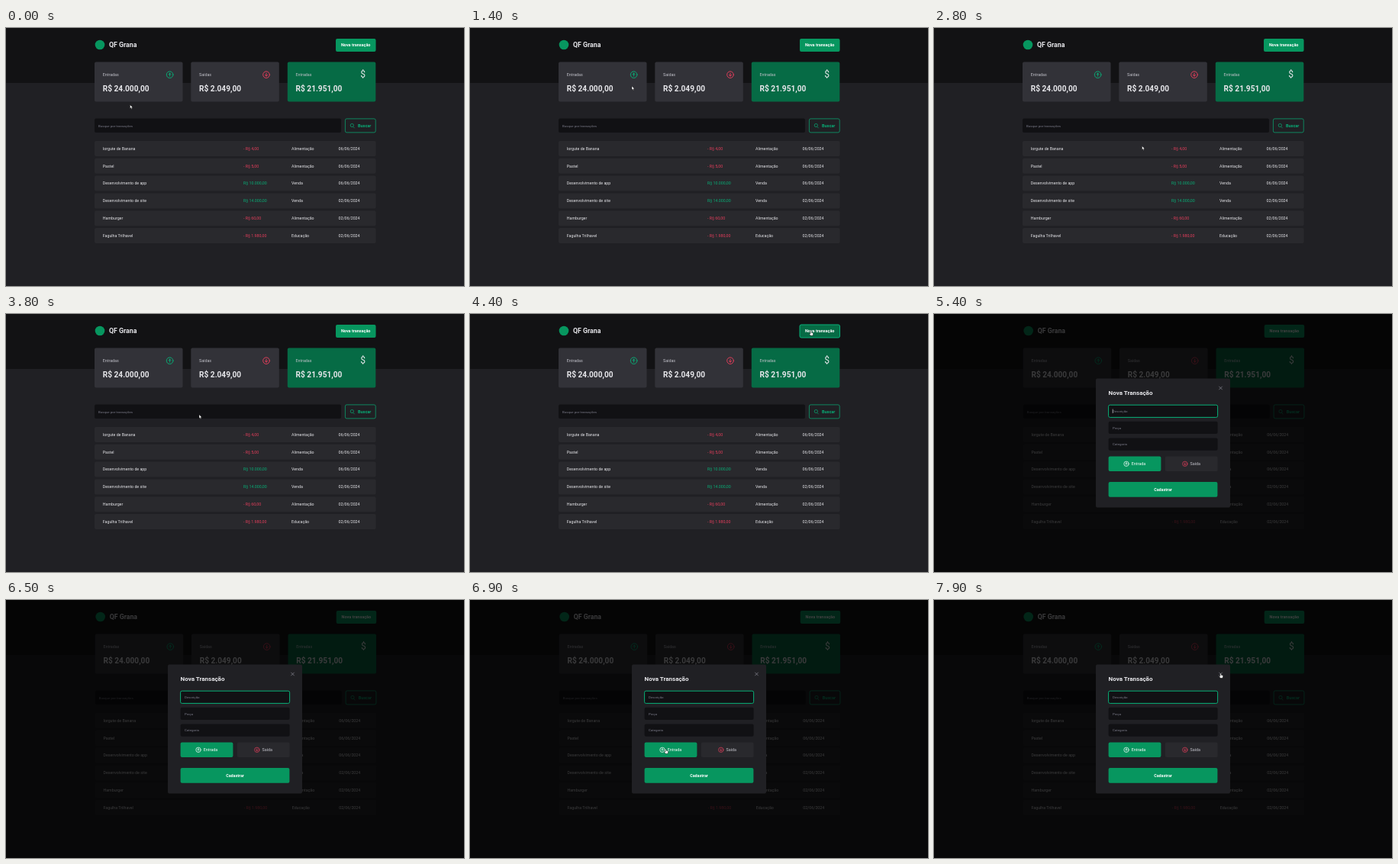
These frames come from a looping animation (600x338 px, 8 s). An HTML page:

```html
<!DOCTYPE html>
<html lang="pt-BR">
<head>
<meta charset="utf-8">
<title>Transações</title>
<style>
  html, body { margin: 0; width: 100%; height: 100%; overflow: hidden; background: #121214; }
  svg { display: block; width: 100vw; height: 100vh; font-family: Roboto, sans-serif; }
</style>
</head>
<body>
<svg id="stage" viewBox="0 0 600 338"></svg>
<script>
const GREEN = '#07965f', DARK_GREEN = '#066b45', MINT = '#08b078', RED = '#e63e5c';
const WHITE = '#e6e6ea', GRAY = '#c4c4cc', DIM = '#7c7c8a', FIELD = '#111114', ROW = '#29292d';

const rect = (x, y, w, h, fill, extra = '') =>
  `<rect x="${x}" y="${y}" width="${w}" height="${h}" rx="2" fill="${fill}" ${extra}/>`;

// y is the vertical centre of the capitals
const text = (x, y, size, fill, content, extra = '') =>
  `<text x="${x}" y="${y + size * 0.355}" font-size="${size}" fill="${fill}" ${extra}>${content}</text>`;

const bold = 'font-weight="700"';
const centered = bold + ' text-anchor="middle"';

const arrowIcon = (x, y, r, color, up) =>
  `<g transform="translate(${x} ${y}) scale(${r} ${up ? -r : r})" fill="none" stroke="${color}"
    stroke-width=".22" stroke-linecap="round" stroke-linejoin="round">
    <circle r="1"/><path d="M0-.45V.45M-.38.08L0 .45L.38.08"/></g>`;

const card = (x, fill, label, value) =>
  rect(x, 44.5, 115.5, 52, fill) + text(x + 10.8, 61, 5.3, GRAY, label) +
  text(x + 10.8, 79, 10.1, WHITE, value, bold);

const tableRow = ([name, price, category, date], i) => {
  const y = 148 + i * 22.8, mid = y + 10;
  return rect(116, y, 368.5, 20, ROW) + text(126.8, mid, 5.27, WHITE, name) +
    text(311, mid, 5.27, price[0] === '-' ? RED : MINT, price) +
    text(374, mid, 5.27, WHITE, category) + text(435.5, mid, 5.27, WHITE, date);
};

const rows = [
  ['Iorgute de Banana', '- R$ 4,00', 'Alimentação', '06/06/2024'],
  ['Pastel', '- R$ 5,00', 'Alimentação', '06/06/2024'],
  ['Desenvolvimento de app', 'R$ 10.000,00', 'Venda', '06/06/2024'],
  ['Desenvolvimento de site', 'R$ 14.000,00', 'Venda', '02/06/2024'],
  ['Hamburger', '- R$ 60,00', 'Alimentação', '02/06/2024'],
  ['Fagulha Trilhavel', '- R$ 1.980,00', 'Educação', '02/06/2024'],
];

const page = `
  <rect width="600" height="338" fill="#202024"/>
  <rect width="600" height="72" fill="#121214"/>
  <g id="content">
    <circle cx="123" cy="22" r="6.3" fill="${GREEN}"/>
    ${text(135, 22, 8.75, WHITE, 'QF Grana', bold)}
    ${rect(432, 14, 52.5, 17, GREEN, 'id="newButton"')}
    ${text(458.2, 22.5, 5.5, '#fff', 'Nova transação', centered)}
    ${card(116, '#323238', 'Entradas', 'R$ 24.000,00')}
    ${card(242.3, '#323238', 'Saídas', 'R$ 2.049,00')}
    ${card(368.8, DARK_GREEN, 'Entradas', 'R$ 21.951,00')}
    ${arrowIcon(214.6, 61.2, 4.3, MINT, true)}
    ${arrowIcon(341, 61.2, 4.3, RED, false)}
    ${text(467.6, 61.2, 12, WHITE, '$', 'text-anchor="middle"')}
    ${rect(116, 118.5, 323, 18.5, FIELD)}
    ${text(121, 128, 4.4, DIM, 'Busque por transações')}
    ${rect(444.4, 118.9, 39.8, 18, 'none', `stroke="${MINT}" stroke-width=".7"`)}
    <path d="M454.8 129.4l1.8 1.8M455.4 127.5a2.1 2.1 0 1 1-4.2 0a2.1 2.1 0 1 1 4.2 0" fill="none" stroke="${MINT}" stroke-width=".7"/>
    ${text(461, 128, 5.5, MINT, 'Buscar', bold)}
    ${rows.map(tableRow).join('')}
  </g>`;

const field = (y, label) => rect(228.6, y, 143, 16.4, FIELD) + text(234, y + 8.3, 4.4, DIM, label);

const modal = `
  <g id="modal">
    <rect width="600" height="338" opacity=".75"/>
    ${rect(212, 84.5, 176, 169, '#202024')}
    ${text(228.6, 103.5, 8, WHITE, 'Nova Transação', bold)}
    <path d="M373.3 94.8l4.4 4.4m0-4.4l-4.4 4.4" stroke="#8d8d99" stroke-width=".7"/>
    ${rect(371, 92.3, 9.2, 9.2, 'none', `id="closeRing" stroke="${MINT}" stroke-width=".9"`)}
    ${field(119, 'Descrição')}${field(140.7, 'Preço')}${field(162.4, 'Categoria')}
    ${rect(228.6, 119.2, 143, 16.2, 'none', `id="fieldRing" stroke="${MINT}" stroke-width="1"`)}
    <path id="caret" d="M234.2 124.5v5.6" stroke="#e1e1e6" stroke-width=".6"/>
    ${rect(228.6, 186.5, 68.8, 19.5, GREEN)}
    ${arrowIcon(252, 196.3, 3.2, '#fff', true)}
    ${text(258.8, 196.4, 5.4, '#fff', 'Entrada')}
    ${rect(302.8, 186.5, 68.8, 19.5, ROW)}
    ${arrowIcon(328.8, 196.3, 3.2, RED, false)}
    ${text(335.6, 196.4, 5.4, GRAY, 'Saída')}
    ${rect(228.6, 220, 142.8, 19.8, GREEN, 'id="submitButton"')}
    ${text(300, 229.9, 5.4, '#fff', 'Cadastrar', centered)}
  </g>`;

const pointers = `
  <g id="pointer" fill="#fff" stroke="#000" stroke-width=".4" stroke-linejoin="round">
    <path id="arrow" d="M0 0V5L1.1 4L1.9 5.8L2.8 5.4L2 3.7H3.6Z"/>
    <path id="hand" d="M-.6.4Q0-.4.6.4V2.2L2.6 2.7Q3.3 3 3.1 4L2.6 6.3H-.4L-2 4Q-1.8 3.1-.6 4Z"/>
  </g>`;

const stage = document.getElementById('stage');
stage.innerHTML = page + modal + pointers;
const el = id => document.getElementById(id);
const show = (id, on) => el(id).setAttribute('visibility', on ? 'inherit' : 'hidden');

// time, x, y of the pointer's hot spot
const path = [
  [0, 162.5, 100.5], [600, 206, 78], [900, 206, 78], [1000, 212, 76], [1600, 212, 76],
  [2100, 300, 168], [2300, 300, 168], [2800, 272.5, 154.5], [3100, 241, 145.5], [3300, 237.5, 140.5],
  [3700, 237.5, 140.5], [4300, 446.5, 22], [4400, 446.5, 22], [4500, 442.8, 21.8], [4700, 442.8, 21.8],
  [5200, 290, 126], [6200, 290, 126], [6700, 257, 194.5], [6900, 256.5, 195], [7100, 272, 226],
  [7300, 300, 235], [7800, 375.5, 96], [8000, 375.5, 96],
];

function pointerAt(t) {
  const i = path.findIndex(p => p[0] > t);
  const [t0, x0, y0] = path[i - 1], [t1, x1, y1] = path[i];
  const k = (t - t0) / (t1 - t0), e = k * k * (3 - 2 * k);
  return [x0 + (x1 - x0) * e, y0 + (y1 - y0) * e];
}

function draw(now) {
  const t = Math.floor(now % 8000 / 100) * 100;
  const open = t >= 4500;
  const [x, y] = pointerAt(t);
  const inside = (left, top, w, h) => x >= left && x <= left + w && y >= top && y <= top + h;

  const overNew = !open && inside(432, 14, 52.5, 17);
  const overSubmit = open && inside(228.6, 220, 142.8, 19.8);
  const overField = open && (inside(228.6, 119, 143, 16.4) || inside(228.6, 140.7, 143, 16.4) || inside(228.6, 162.4, 143, 16.4));
  const clickable = overNew || overSubmit || open &&
    (inside(228.6, 186.5, 68.8, 19.5) || inside(302.8, 186.5, 68.8, 19.5) || inside(371, 92, 9.5, 9.5));

  const newButton = el('newButton');
  newButton.setAttribute('fill', overNew ? DARK_GREEN : GREEN);
  newButton.setAttribute('stroke', overNew && t >= 4300 ? MINT : 'none');
  el('submitButton').setAttribute('fill', overSubmit ? DARK_GREEN : GREEN);
  el('content').setAttribute('transform', `translate(${open ? 0.7 : 0})`);

  show('modal', open);
  show('closeRing', open && t < 5300);
  show('fieldRing', open && t >= 5300);
  show('caret', t >= 5300 && t < 5700);
  show('pointer', !overField);
  show('arrow', !clickable);
  show('hand', clickable);
  el('pointer').setAttribute('transform', `translate(${x} ${y})`);
}

const start = performance.now();
function tick() {
  draw(performance.now() - start);
  requestAnimationFrame(tick);
}
tick();
</script>
</body>
</html>
```
